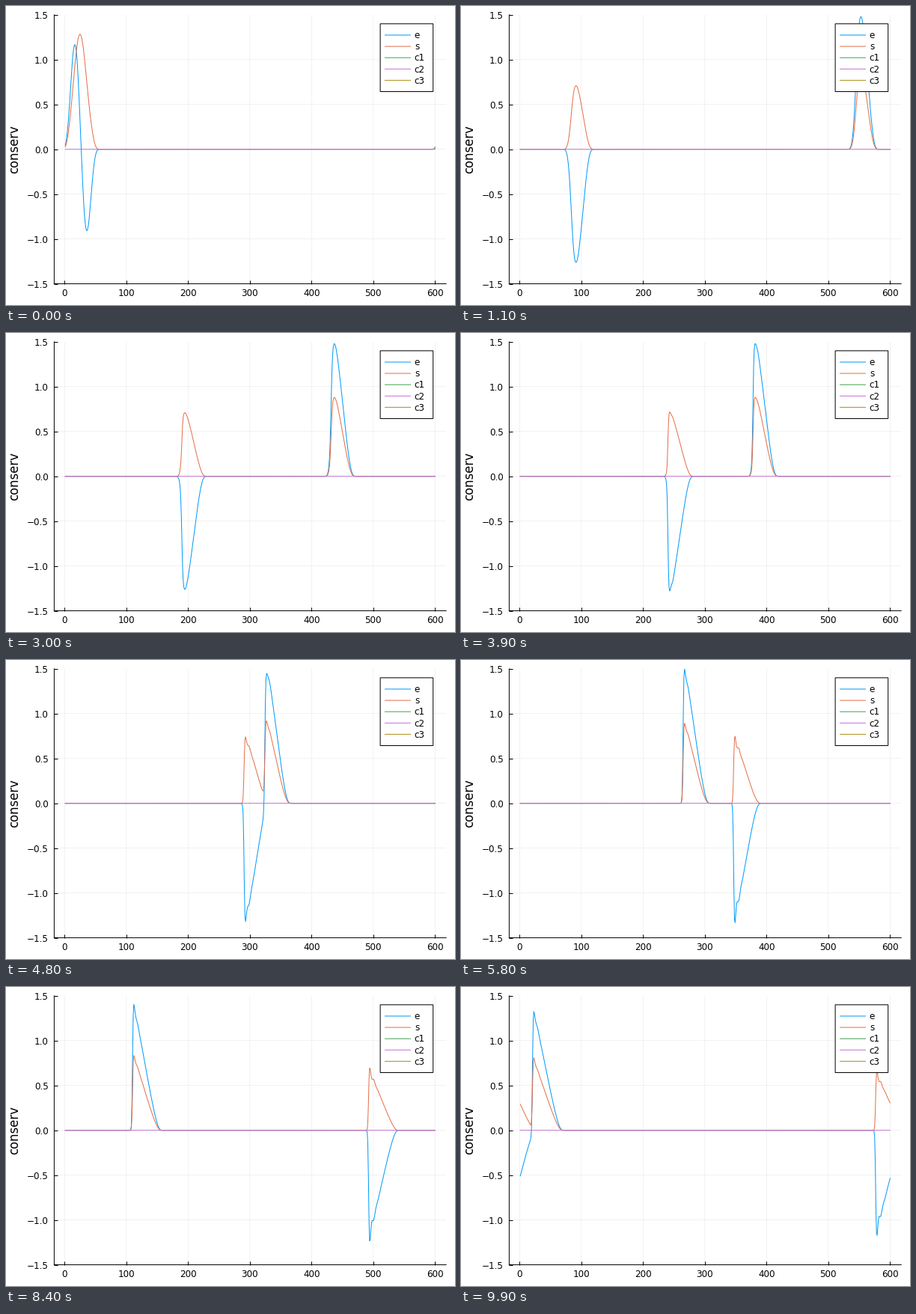
A matplotlib script that plays this animation: 600x400 px, repeating every 10000 ms.

```python
import numpy as np
import matplotlib.pyplot as plt
from matplotlib.animation import FuncAnimation
from matplotlib.patches import Rectangle

W, H, DPI = 600, 400, 100
FRAMES, INTERVAL = 100, 100
PX = 72 / DPI
N = 600
WIDTH = 50
SOUND = 1 / np.sqrt(3)

# Each pulse: amplitude, velocity, extra crest speed, ringing behind the front
LEFT = dict(amp=1.49, speed=-SOUND - 0.0025, steepen=0.031, gain=0.045)
RIGHT = dict(amp=-1.27, speed=SOUND, steepen=0.0342, gain=0.15)

COLORS = {"e": "#009afa", "s": "#e36f47", "c1": "#3ea44e",
          "c2": "#c371d2", "c3": "#ac8e18"}

plt.rcParams.update({"font.family": "DejaVu Sans", "font.size": 12 * PX,
                     "path.snap": False})

x = np.arange(1, N + 1)
q = np.arange(-20, 60, 0.1)
y = np.arange(-20, 60, 0.05)
bump = np.clip(4 * y * (WIDTH - y) / WIDTH**2, 0, None) ** 4
potential = -np.cumsum(bump) * 0.05
kernel = np.exp(-0.5 * (np.arange(-40, 41) / 10) ** 2)
kernel /= kernel.sum()
half_gap2 = (q[:, None] - y[None, :]) ** 2 / 2


def profile(t, steepen):
    """Steepening pulse (Hopf-Lax solution), slightly smoothed, and its front."""
    foot = np.argmin(steepen * potential + half_gap2 / t, axis=1)
    p = np.convolve(bump[foot], kernel, mode="same")
    return p, q[np.argmax(np.gradient(p))]


def ringing(front, t, gain):
    d = q - front
    gate = np.clip((t - 330) / 260, 0, 1)
    wave = np.exp(-np.clip(d, 0, None) / 5) * np.cos(2 * np.pi * (d - 2.3) / 7)
    return 1 + gain * gate * wave


def pulse(t, amp, speed, steepen, gain):
    p, front = profile(t, steepen)
    local = (x - 1 - speed * t + 20) % N - 20
    return amp * np.interp(local, q, p * ringing(front, t, gain), left=0, right=0)


def flux(v):
    return SOUND * v + 0.012 * v**2


def fields(frame):
    t = 10.0 * (frame + 1)
    left, right = pulse(t, **LEFT), pulse(t, **RIGHT)
    return left + right, flux(left) - flux(right)


fig = plt.figure(figsize=(W / DPI, H / DPI), dpi=DPI, facecolor="white")

L, R, T, B = 64.4, 588.19, 11.81, 371.61
ax = fig.add_axes([L / W, 1 - B / H, (R - L) / W, (B - T) / H])
pad = 0.03 * (N - 1)
ax.set_xlim(1 - pad, N + pad)
ax.set_ylim(-1.5, 1.5)
ax.set_xticks(range(0, 601, 100))
ax.set_yticks(np.arange(-1.5, 1.6, 0.5))
ax.yaxis.set_major_formatter(lambda v, _: f"{v:.1f}".replace("-", "\u2212"))
ax.grid(color="black", alpha=0.1, lw=0.5 * PX)
ax.set_axisbelow(True)
ax.tick_params(direction="in", length=4.72 * PX, width=PX)
ax.tick_params(axis="x", pad=6.7 * PX)
ax.tick_params(axis="y", pad=7.5 * PX)
for side in ("top", "right"):
    ax.spines[side].set_visible(False)
for side in ("left", "bottom"):
    ax.spines[side].set_linewidth(PX)

# c1 and c3 lie outside the plotted range and appear in the legend only.
lines = {name: ax.plot(x, np.zeros(N), color=COLORS[name], lw=PX)[0]
         for name in ("e", "s", "c2")}

# Pixel-space layer for the axis title and the legend.
over = fig.add_axes([0, 0, 1, 1], zorder=5)
over.set_xlim(0, W)
over.set_ylim(H, 0)
over.axis("off")
over.text(16.3, (T + B) / 2, "conserv", fontsize=16.5 * PX, rotation=90,
          rotation_mode="anchor", ha="center", va="baseline")

ROW = 15.12
box_top, box_right = 23.8, R - (R - L) / 30
over.add_patch(Rectangle((500.1, box_top), box_right - 500.1, 6 * ROW,
                         fc="white", ec="black", lw=PX))
for i, (name, c) in enumerate(COLORS.items(), 1):
    row = box_top + ROW * i
    over.plot([506, 541], [row, row], color=c, lw=PX, solid_capstyle="butt")
    over.text(545.8, row + 4.32, name, va="baseline")


def update(frame):
    e, s = fields(frame)
    lines["e"].set_ydata(e)
    lines["s"].set_ydata(s)
    return list(lines.values())


anim = FuncAnimation(fig, update, frames=FRAMES, interval=INTERVAL,
                     repeat=True, repeat_delay=0)
plt.show()
```
